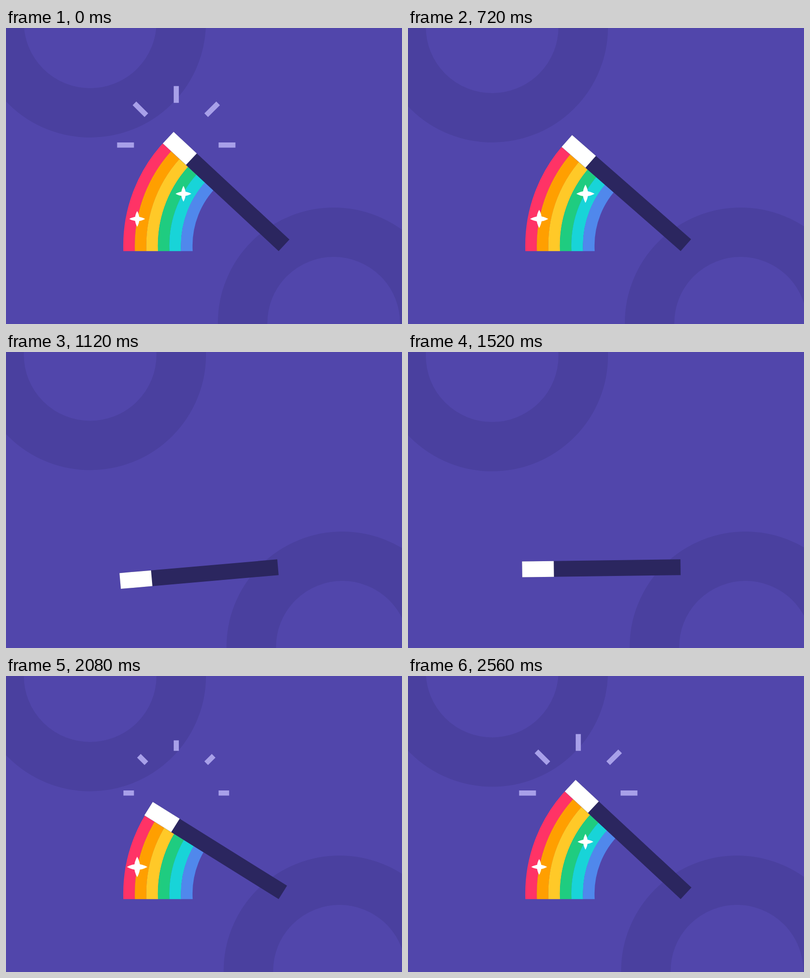
Recreate the animation shown at these times as an HTML page. Size 800 by 600 pixels, loop 2.88 s.

```html
<!DOCTYPE html>
<html lang="en">
<head>
<meta charset="utf-8">
<title>Magic wand</title>
<style>
  html, body { margin: 0; width: 100%; height: 100%; overflow: hidden; background: #5146ab; }
  svg { display: block; width: 100vw; height: 100vh; }
</style>
</head>
<body>
<svg viewBox="0 0 800 600">
  <defs>
    <clipPath id="swept"><path id="sweep"/></clipPath>
    <g id="sparkle">
      <path id="petal" d="M0-16Q9 0 0 16Q-9 0 0-16"/>
      <use href="#petal" transform="rotate(90)"/>
    </g>
  </defs>
  <rect width="800" height="600" fill="#5146ab"/>
  <g fill="none" stroke="#4a409f" stroke-width="100">
    <circle id="ringTop" cx="170" r="184"/>
    <circle id="ringBottom" cy="598" r="184"/>
  </g>
  <g id="rays" stroke="#a8a0e9" stroke-width="10.4"></g>
  <g id="rainbow" clip-path="url(#swept)" fill="none"></g>
  <g id="wand">
    <rect x="-320" y="-32" width="320" height="32" fill="#2b265f"/>
    <rect x="-320" y="-32" width="64" height="32" fill="#fff"/>
  </g>
  <g fill="#fff">
    <use id="starLow" href="#sparkle"/>
    <use id="starHigh" href="#sparkle"/>
  </g>
</svg>
<script>
const LOOP = 2880, TICK = 80;
const PIVOT = { x: 550.8, y: 452.2 };
const RAY_INNER = 85.5;
const BANDS = ['#ff3366', '#ff9f00', '#ffc928', '#1fcc80', '#18d4d8', '#5088ec'];
const BAND_WIDTH = 23.28;

// Keyframes are [tick, value] pairs, eased in and out between neighbours.
const wandAngle = [[4, 43], [8, 45], [14, -5], [18, 0], [22, -5], [28, 45], [32, 43]];
const rayLength = [[4, 34], [6, 42.5], [8, 0], [25, 0], [27, 42.5], [29, 34]];
const lowScale = [[8, 1], [10, 1.3], [12, 0], [24, 0], [26, 1.3], [28, 1]];
const highScale = [[8, 1], [10, 1.3], [12, 0], [26, 0], [28, 1.3], [30, 1]];
const drift = [[0, 0], [18, 20], [36, 0]];

const el = id => document.getElementById(id);

function add(parent, tag, attrs) {
  const node = document.createElementNS('http://www.w3.org/2000/svg', tag);
  for (const name in attrs) node.setAttribute(name, attrs[name]);
  return parent.appendChild(node);
}

function valueAt(keys, tick) {
  const next = keys.findIndex(([k]) => k > tick);
  if (next === 0) return keys[0][1];
  if (next < 0) return keys[keys.length - 1][1];
  const [t0, a] = keys[next - 1], [t1, b] = keys[next];
  const x = (tick - t0) / (t1 - t0);
  return a + (b - a) * x * x * (3 - 2 * x);
}

BANDS.forEach((stroke, i) => add(el('rainbow'), 'circle', {
  cx: 546, cy: 441, r: 309 - BAND_WIDTH * (i + 0.5), stroke, 'stroke-width': BAND_WIDTH + 0.2
}));

const rays = [-90, -45, 0, 45, 90].map(angle => add(el('rays'), 'line', {
  y1: -RAY_INNER, transform: `translate(344 237.2) rotate(${angle})`
}));

function placeStar(id, x, y, scale) {
  el(id).setAttribute('transform', `translate(${x} ${y}) scale(${scale})`);
}

function draw(time) {
  const tick = Math.floor((time % LOOP) / TICK);

  const shift = valueAt(drift, tick);
  el('ringTop').setAttribute('cy', shift - 12);
  el('ringBottom').setAttribute('cx', shift + 662);

  const angle = valueAt(wandAngle, tick);
  el('wand').setAttribute('transform', `translate(${PIVOT.x} ${PIVOT.y}) rotate(${angle})`);

  // The rainbow shows only between the wand's lower edge and the ground.
  const rad = Math.max(0, angle) * Math.PI / 180;
  const farX = PIVOT.x - 400 * Math.cos(rad);
  const farY = PIVOT.y - 400 * Math.sin(rad);
  el('sweep').setAttribute('d',
    `M${PIVOT.x} ${PIVOT.y}L${farX} ${farY}H0V${PIVOT.y}Z`);
  el('rainbow').style.display = angle > 0 ? '' : 'none';

  const length = valueAt(rayLength, tick);
  el('rays').style.display = length > 0 ? '' : 'none';
  for (const ray of rays) ray.setAttribute('y2', -RAY_INNER - length);

  placeStar('starLow', 265, 387, valueAt(lowScale, tick));
  placeStar('starHigh', 358.5, 336, valueAt(highScale, tick));
}

const start = performance.now();
function frame() {
  draw(performance.now() - start);
  requestAnimationFrame(frame);
}
frame();
</script>
</body>
</html>
```
